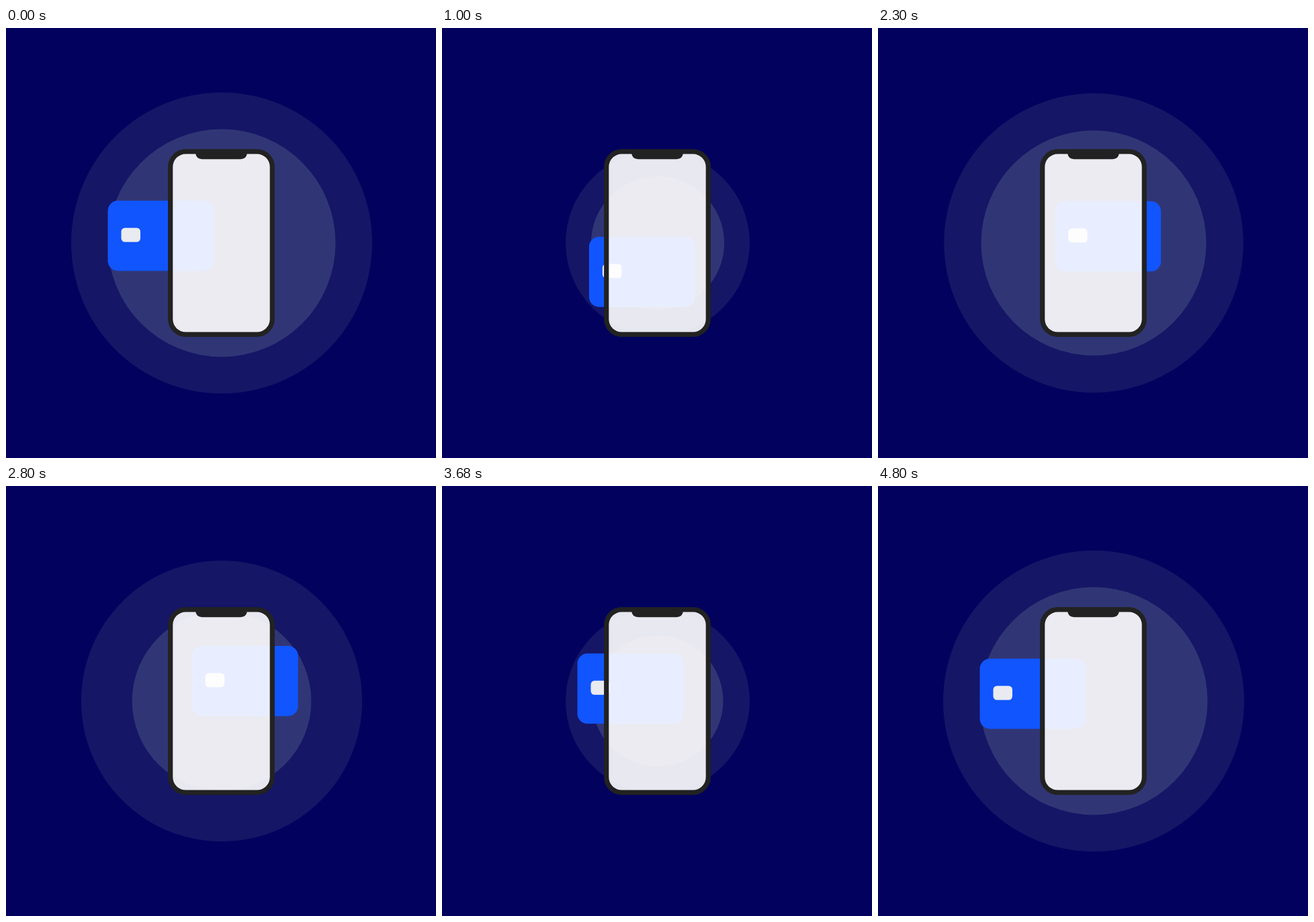
An HTML page that plays this animation: 640x640 px, repeating every 4.82 s.

```html
<!DOCTYPE html>
<html lang="en">
<head>
<meta charset="utf-8">
<title>Card and phone</title>
<style>
  html, body { margin: 0; width: 100%; height: 100%; overflow: hidden; background: #02025e; }
  svg { display: block; width: 100%; height: 100%; }
</style>
</head>
<body>
<svg viewBox="0 0 640 640">
  <circle id="outer" cx="321" cy="320" r="224" fill="#151666"/>
  <circle id="inner" cx="321" cy="320" r="169.5" fill="#303675"/>
  <g id="card">
    <rect width="158" height="104.5" rx="15" fill="#1155ff"/>
    <rect x="20" y="40.5" width="28.5" height="21" rx="5.5" fill="#e9ebf0"/>
  </g>
  <rect x="246" y="185" width="149" height="270" rx="22" fill="#fff" fill-opacity=".9"/>
  <rect x="244.7" y="183.8" width="151.6" height="272.4" rx="23" fill="none" stroke="#222" stroke-width="7.2"/>
  <path d="M282 184H359V186Q358 195.2 349 195.2H292Q283 195.2 282 186Z" fill="#222"/>
</svg>
<script>
const LOOP = 4820;
const $ = id => document.getElementById(id);
const clamp = x => Math.max(0, Math.min(1, x));
const smooth = x => x * x * (3 - 2 * x);
// Starts gently and covers most of the way late
const lateSmooth = x => smooth((1.74 - Math.sqrt(3.0276 - 2.96 * x)) / 1.48);

// Rises from 0 to 1 between a and b, rests, then falls back between c and d
const dip = (t, a, b, c, d, ease) =>
  Math.min(ease(clamp((t - a) / (b - a))), ease(clamp((d - t) / (d - c))));

// Both rings shrink and grow twice per loop
const outerRadius = t => 224 - 87 * (
  dip(t, 40, 990, 1465, 2415, lateSmooth) + dip(t, 2415, 3365, 3850, 4800, lateSmooth));
const innerRadius = t => 169.5 - 72 * (
  dip(t, 0, 1100, 1400, 2400, smooth) + dip(t, 2400, 3200, 3800, 4800, smooth));

// The card visits three corners, resting briefly at each
const corners = [[151.5, 257], [224.2, 314.9], [276.7, 237.9]];
function cardPosition(t) {
  const leg = Math.min(2, Math.floor(t / 1500));
  const eased = smooth(clamp((t - leg * 1500) / 1200));
  const from = corners[leg], to = corners[(leg + 1) % 3];
  return from.map((v, i) => v + (to[i] - v) * eased);
}

function draw() {
  const t = performance.now() % LOOP;
  $("outer").setAttribute("r", outerRadius(t));
  $("inner").setAttribute("r", innerRadius(t));
  $("card").setAttribute("transform", `translate(${cardPosition(t)})`);
  requestAnimationFrame(draw);
}
draw();
</script>
</body>
</html>
```
